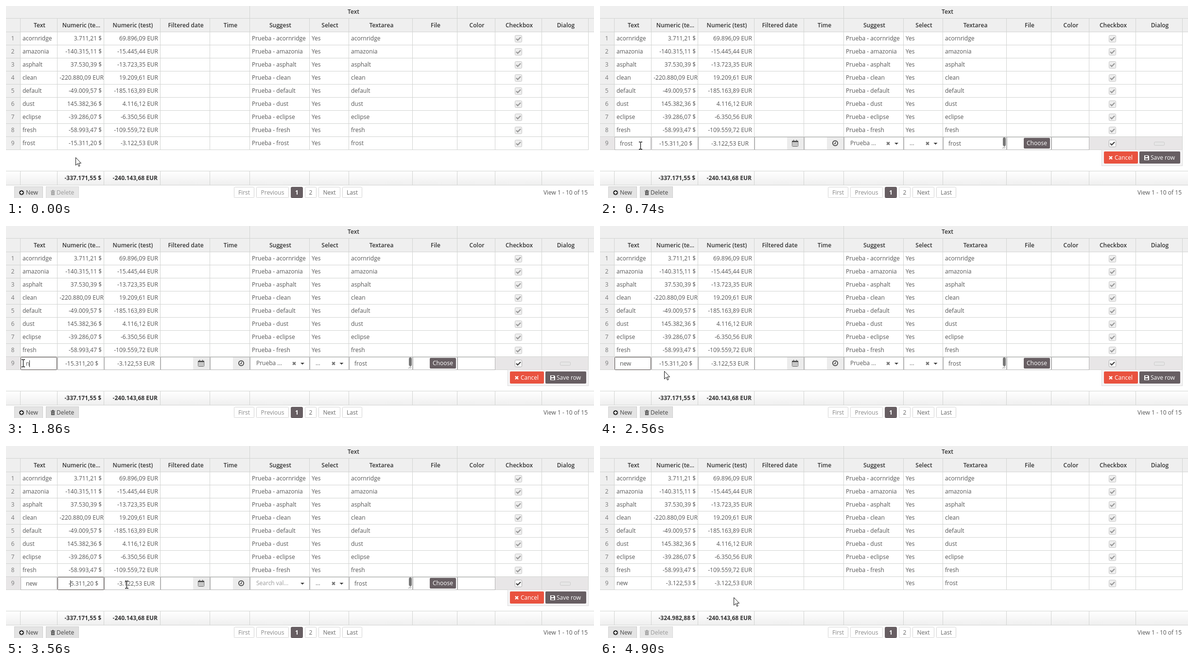
Recreate the animation shown at these times as an HTML page. Size 1210x396 px, loop 5580 ms.

```html
<!DOCTYPE html>
<html lang="en">
<head>
<meta charset="utf-8">
<title>Inline grid editing</title>
<style>
  html, body { margin: 0; width: 100%; height: 100%; overflow: hidden; background: #fff; }
  svg { display: block; font: 12px "Open Sans", sans-serif; white-space: pre; }
</style>
</head>
<body>
<svg width="1210" height="396">
  <defs>
    <linearGradient id="foot" x2="0" y2="1">
      <stop stop-color="#fff"/><stop offset="1" stop-color="#efefef"/>
    </linearGradient>
    <clipPath id="numCell"><path d="M106 54h95v243h-95z"/></clipPath>
  </defs>
  <g id="base"></g>
  <g id="live"></g>
</svg>
<script>
const LOOP = 5580, LINE = '#d2d4d2', HEAD = '#efefef', DARK = '#675e62', INK = '#555';
const cols = [29, 105, 201, 317, 419, 501, 624, 705, 836, 928, 1006, 1102, 1198];
const heads = ['Text', 'Numeric (te...', 'Numeric (test)', 'Filtered date', 'Time', 'Suggest',
  'Select', 'Textarea', 'File', 'Color', 'Checkbox', 'Dialog'];
const rows = [
  ['acornridge', '3.711,21 $', '69.896,09 EUR'],
  ['amazonia', '-140.315,11 $', '-15.445,44 EUR'],
  ['asphalt', '37.530,39 $', '-13.723,35 EUR'],
  ['clean', '-220.880,09 EUR', '19.209,61 EUR'],
  ['default', '-49.009,57 $', '-185.163,89 EUR'],
  ['dust', '145.382,36 $', '4.116,12 EUR'],
  ['eclipse', '-39.286,07 $', '-6.350,56 EUR'],
  ['fresh', '-58.993,47 $', '-109.559,72 EUR']
];

const text = (s, x, y, fill = INK, anchor = 'start', weight = 400) =>
  `<text x="${x}" y="${y}" fill="${fill}" text-anchor="${anchor}" font-weight="${weight}">${s}</text>`;
const rect = (x, y, w, h, fill, rx = 0) =>
  `<rect x="${x}" y="${y}" width="${w}" height="${h}" rx="${rx}" fill="${fill}"/>`;
const box = (x, y, w, h, fill, stroke, rx = 0) =>
  `<rect x="${x + .5}" y="${y + .5}" width="${w - 1}" height="${h - 1}" rx="${rx}" fill="${fill}" stroke="${stroke}"/>`;
const hline = (y, w) => rect(0, y, w, 1, LINE);
const vline = (x, y, h) => rect(x, y, 1, h, LINE);
const stroke = (d, color, width) => `<path d="${d}" fill="none" stroke="${color}" stroke-width="${width}"/>`;
const shape = (d, color) => `<path d="${d}" fill="${color}"/>`;
const group = (s, attrs) => `<g ${attrs}>${s}</g>`;

const cross = (x, y, r, color) =>
  stroke(`M${x - r} ${y - r}l${2 * r} ${2 * r}m0 ${-2 * r}l${-2 * r} ${2 * r}`, color, 2.4);
const caretDown = (x, y) => shape(`M${x - 4} ${y - 2}h8l-4 4z`, '#444');
const checkbox = (y, on) => box(1047, y - 7, 15, 15, on ? '#fff' : '#eee', on ? '#aaa' : '#c4c4c4', 2) +
  stroke(`M1050 ${y + .5}l3 3 6-6`, on ? '#444' : '#999', 2.4);

function rowCells(i, name, num, eur, suggest, area) {
  const y = 71 + 27 * i, wide = num.length > 14;
  return text(name, 34, y) +
    group(text(num, wide ? 201 : 197, y, INK, 'end'), 'clip-path="url(#numCell)"') +
    text(eur, 313, y, INK, 'end') + text(suggest, 506, y) +
    text('Yes', 629, y) + text(area, 710, y) + checkbox(y - 4, false);
}

function pageButton(s, x, w, color) {
  const on = s === '1';
  return box(x, 373, w, 23, on ? DARK : '#fff', on ? DARK : '#d4d4d4', 2) +
    text(s, x + w / 2, 389, on ? '#fff' : color, 'middle', on ? 700 : 400);
}

function drawBase() {
  let s = rect(0, 0, 1210, 53, HEAD) + rect(0, 53, 29, 244, HEAD) +
    rect(0, 341, 1210, 28, 'url(#foot)') +
    hline(25, 1210) + hline(53, 1210) + hline(340, 1210) + hline(369, 1210) +
    vline(501, 0, 25) + vline(928, 0, 25) + text('Text', 715, 16, '#333', 'middle', 600);
  cols.forEach((x, i) => {
    s += vline(x, 26, 271);
    if (x < 1198) {
      s += vline(x, 341, 28) +
        text(heads[i], (x + cols[i + 1]) / 2 + 2, 44, '#333', 'middle', 600);
    }
  });
  for (let i = 0; i < 9; i++) s += hline(80 + 27 * i, 1199) + text(i + 1, 14, 71 + 27 * i, '#777', 'middle');
  rows.forEach((r, i) => s += rowCells(i, ...r, 'Prueba - ' + r[0], r[0]));
  s += text('-240.143,68 EUR', 312, 359, '#333', 'end', 700) +
    box(17, 372, 59, 26, '#e4e4e4', '#cfcfcf') + `<circle cx="32" cy="385" r="5" fill="#333"/>` +
    stroke('M29 385h6m-3-3v6', '#fff', 1.8) + text('New', 41, 389, '#444') +
    pageButton('First', 469, 42, '#888') + pageButton('Previous', 515, 67, '#888') +
    pageButton('1', 586, 25) + pageButton('2', 615, 24, '#666') +
    pageButton('Next', 643, 45, '#666') + pageButton('Last', 692, 41, '#666') +
    text('View 1 - 10 of 15', 1197, 389, INK, 'end');
  return s;
}

// Pointer path: time, x, y
const path = [[20, 143, 312], [420, 83, 284], [660, 83, 284], [740, 83, 288], [980, 83, 286],
  [1280, 40, 284], [1440, 40, 284], [1500, 35, 283], [2440, 35, 283], [2560, 132, 299],
  [2840, 132, 287], [2980, 132, 287], [3200, 248, 286], [4700, 248, 286], [4900, 275, 312]];

function pointerAt(t) {
  const i = path.findIndex(p => p[0] > t);
  if (i < 0) return path[path.length - 1].slice(1);
  if (!i) return path[0].slice(1);
  const [a, x, y] = path[i - 1], [b, x2, y2] = path[i];
  const u = (t - a) / (b - a), k = u * u * (3 - 2 * u);
  return [Math.round(x + (x2 - x) * k), Math.round(y + (y2 - y) * k)];
}

const arrow = (x, y) => `<path transform="translate(${x + .5} ${y + .5})" fill="#fff" stroke="#111"
  d="M0 0v16l3.7-3.5 2.5 5.7 2.3-1-2.4-5.5H11z"/>`;
const beam = (x, y) => stroke(`M${x - 3} ${y - 7.5}h3m1 0h3m-3.5 0v15m-3.5 0h3m1 0h3`, '#111', 1.3);
const caret = x => rect(x, 277, 1, 14, '#222');

function nameField(t, x) {
  if (t >= 1860) {
    const n = t < 2020 ? 1 : t < 2080 ? 2 : 3;
    return text('new'.slice(0, n), 41, 288) + (t < 2440 ? caret([41, 48, 55, 64][n]) : '');
  }
  if (t < 980) return text('frost', 41, 288);
  const edges = [41, 45, 50, 57, 63, 67], n = edges.findIndex(e => e >= Math.min(x, 67));
  return rect(edges[n], 277, 67 - edges[n], 15, '#3390ff') +
    text('frost'.slice(0, n) + `<tspan fill="#fff">${'frost'.slice(n)}</tspan>`, 41, 288) +
    (x > 67 ? caret(67) : '');
}

function editRow(t, x) {
  const input = (a, b, focus) => box(a, 270, b - a + 1, 27, '#fff', focus ? '#4d4543' : '#b4b4b4', focus ? 1 : 0);
  const numFocus = t >= 2840 && t < 4280, cleared = t >= 2980, saving = t >= 4280;
  const num = t < 3560 ? '-15.311,20 $' : t < 3700 ? '-5.311,20 $' : t < 4080 ? '5.311,20 $' : '-3.122,53 $';
  let s = rect(0, 270, 1198, 26, '#e8e6e7') + text(9, 14, 287, '#777', 'middle') + vline(1102, 270, 27);
  s += input(30, 104, t >= 980 && t < 2840) + nameField(t, x) +
    input(106, 201, numFocus) + text(num, 190, 288, INK, 'end') + (numFocus && t < 4080 ? caret(132) : '') +
    input(202, 317) + text('-3.122,53 EUR', 306, 288, INK, 'end') +
    input(318, 419) + rect(385, 271, 34, 25, '#ececec') +
    input(420, 501) + rect(467, 271, 34, 25, '#ececec');
  // Calendar and clock
  s += box(395, 278, 13, 12, '#fff', '#555', 1) + rect(395, 278, 13, 3, '#555') +
    stroke('M398.5 276v4m6-4v4', '#555', 1.5) +
    stroke('M398.5 281v8m3-8v8m3-8v8m-9-5.500h12m-12 3h12', '#999', 1) +
    `<circle cx="484" cy="283" r="5.2" fill="none" stroke="#444" stroke-width="1.7"/>` +
    stroke('M484.5 280v4h-3', '#444', 1.3);
  s += input(502, 624) + text(cleared ? 'Search val...' : 'Prueba ...', 515, 287, cleared ? '#999' : INK) +
    (cleared ? '' : cross(593, 283.5, 2.8, '#777')) + caretDown(610, 284) +
    input(625, 705) + text('...', 637, 287) + cross(674, 283.5, 2.8, '#777') + caretDown(690.5, 284) +
    input(706, 836) + text('frost', 717, 288) + rect(829, 271, 6, 18, '#777', 3) +
    stroke('M828 294l6-6m-3 6l3-3', '#777', 1) +
    input(837, 928) + rect(872, 272, 54, 22, DARK, 2) + text('Choose', 899, 287, '#fff', 'middle') +
    input(929, 1006) + checkbox(283, true) + box(1140, 280, 22, 8, '#e6e6e6', '#cbcbcb', 2);
  return s + actions(t, saving);
}

function actions(t, saving) {
  const disk = shape('M1120 308h8l2 2v8h-10z', '#fff') +
    rect(1122, 309, 5, 3, DARK) + rect(1122, 314, 6, 3, DARK);
  const spin = group(
    stroke('M-4.2-1A4.3 4.3 0 0 1 3.2-2.9M4.2 1A4.3 4.3 0 0 1-3.2 2.9', '#fff', 1.8) +
    shape('M5-5v4.3H.7zM-5 5V.7h4.3z', '#fff'),
    `transform="translate(1125 313) rotate(${(t - 4380) * .18})"`);
  const buttons = rect(1037, 300, 70, 25, '#e9523f', 2) + cross(1051, 313, 3, '#fff') +
    text('Cancel', 1059, 317, '#fff') +
    rect(1110, 300, 84, 25, DARK, 2) + (saving ? spin : disk) + text('Save row', 1133, 317, '#fff');
  return box(1032, 296, 167, 34, '#f5f4f5', '#dcdcdd') + group(buttons, `opacity="${saving ? .62 : 1}"`);
}

function deleteButton(on) {
  const color = on ? '#444' : '#999';
  return box(82, 372, 68, 26, on ? '#e0e0e0' : '#e8e8e8', on ? '#cfcfcf' : '#dadada') +
    shape('M92 381h2.5l1-1.5h2l1 1.5h2.5v1.3h-9zM93 383h7v7h-7z', color) +
    stroke('M94.9 384v5m1.7-5v5m1.7-5v5', '#ddd', .7) + text('Delete', 104, 389, color);
}

function drawLive(t) {
  const [x, y] = pointerAt(t), editing = t >= 660 && t < 4560, saved = t >= 4280;
  const last = saved ? ['new', '-3.122,53 $', '-3.122,53 EUR', '', 'frost']
    : ['frost', '-15.311,20 $', '-3.122,53 EUR', 'Prueba - frost', 'frost'];
  return (editing ? editRow(t, x) : rowCells(8, ...last)) +
    text(saved ? '-324.982,88 $' : '-337.171,55 $', 196, 359, '#333', 'end', 700) +
    deleteButton(editing) + (editing && y < 297 ? beam(x, y) : arrow(x, y));
}

const live = document.getElementById('live');
document.getElementById('base').innerHTML = drawBase();
const start = performance.now();
function tick() {
  live.innerHTML = drawLive((performance.now() - start) % LOOP);
  requestAnimationFrame(tick);
}
tick();
</script>
</body>
</html>
```
